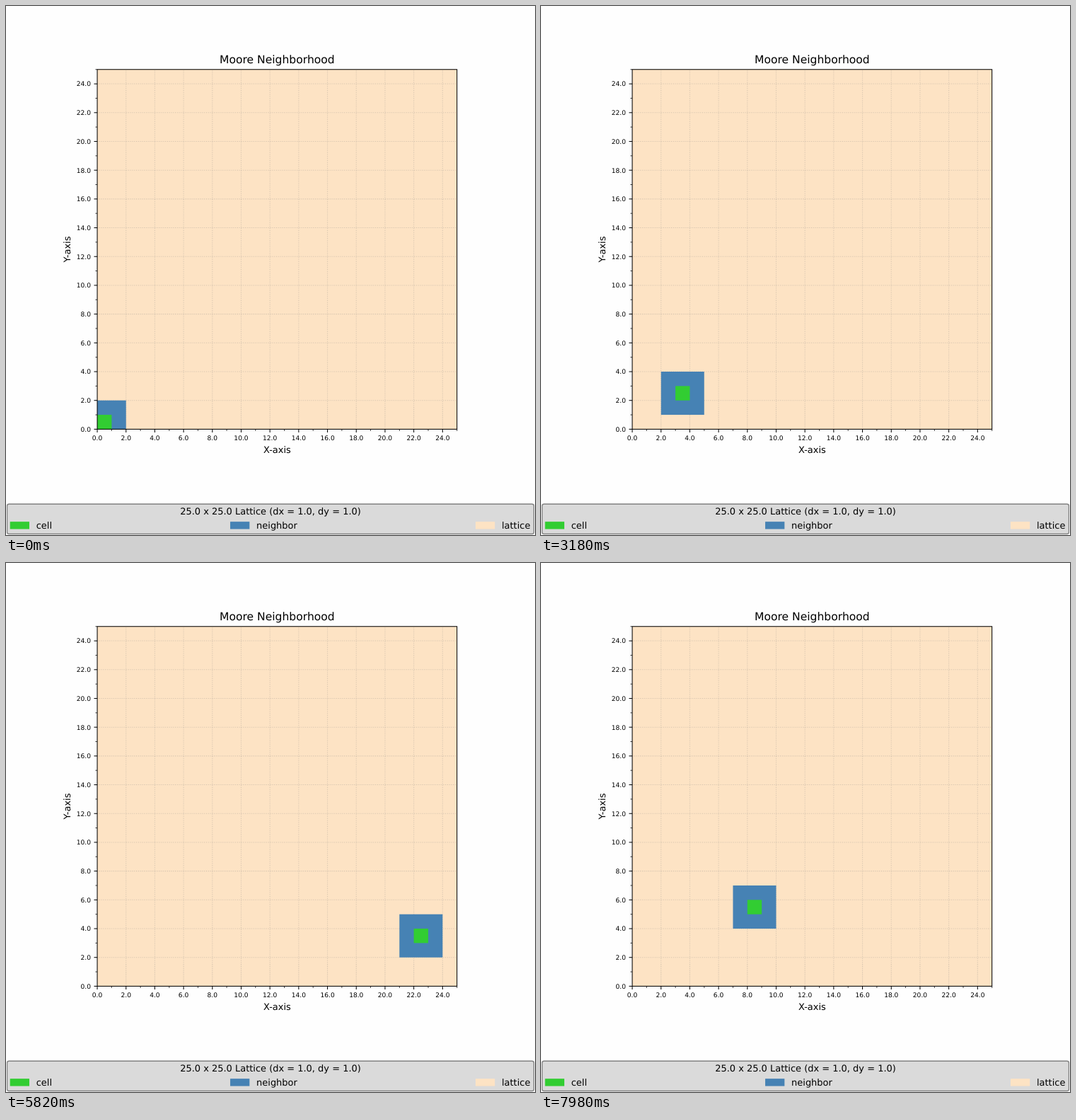
Write an HTML page that moves like this. It is 748 px wide and 748 px high and loops after 8000 ms.

```html
<!DOCTYPE html>
<html lang="en">
<head>
<meta charset="utf-8">
<title>Moore Neighborhood</title>
<style>
  html, body { margin: 0; width: 100%; height: 100%; overflow: hidden; background: #fefefe; }
  svg { display: block; width: 100vw; height: 100vh; }
  text { font-family: "DejaVu Sans", sans-serif; font-size: 13.89px; text-rendering: geometricPrecision; }
  .title { font-size: 16.67px; }
  .tick { font-size: 9.72px; }
  .mid { text-anchor: middle; }
  .end { text-anchor: end; }
  .line { fill: none; stroke: #000; stroke-width: 1.11; }
  .minor { stroke-width: 0.83; }
  .grid { stroke: #808080; stroke-opacity: 0.35; stroke-dasharray: 1.11 1.83; }
  .lattice { fill: #fde3c4; stroke: #fde3c4; }
  .neighbor { fill: #4682b4; stroke: #4682b4; }
  .cell { fill: #32cd32; stroke: #32cd32; }
  .area { stroke: none; }
  .swatch { stroke-width: 1.39; }
  .legend { fill: #dadada; stroke: #808080; stroke-width: 1.39; }
</style>
</head>
<body>
<svg id="plot" viewBox="0 0 800 800"></svg>
<script>
const SIZE = 25, LEFT = 138, BOTTOM = 640, SIDE = 544;
const UNIT = SIDE / SIZE, STEP = 60, LOOP = 8000;
const svg = document.getElementById("plot");

const px = x => LEFT + x * UNIT;
const py = y => BOTTOM - y * UNIT;

function add(tag, attrs, content = "") {
  const node = document.createElementNS("http://www.w3.org/2000/svg", tag);
  setAttrs(node, attrs);
  node.textContent = content;
  svg.append(node);
  return node;
}

function setAttrs(node, attrs) {
  for (const key in attrs) node.setAttribute(key, attrs[key]);
}

const rect = (cls, x, y, width, height, rx = 0) =>
  add("rect", { class: cls, x, y, width, height, rx });
const path = (cls, d) => add("path", { class: cls, d });
const label = (cls, x, y, content, more = {}) =>
  add("text", { class: cls, x, y, ...more }, content);

// Places a rectangle given by lattice bounds
function place(node, x0, y0, x1, y1) {
  setAttrs(node, { x: px(x0), y: py(y1), width: (x1 - x0) * UNIT, height: (y1 - y0) * UNIT });
}

rect("lattice area", LEFT, BOTTOM - SIDE, SIDE, SIDE);
for (let i = 2; i < SIZE; i += 2) {
  path("line grid", `M${px(i)} ${BOTTOM}v${-SIDE}`);
  path("line grid", `M${LEFT} ${py(i)}h${SIDE}`);
}

const neighbors = rect("neighbor area", 0, 0, 0, 0);
const cell = rect("cell area", 0, 0, 0, 0);

rect("line", LEFT, BOTTOM - SIDE, SIDE, SIDE);
for (let i = 0; i <= SIZE; i++) {
  const major = i % 2 === 0;
  const cls = major ? "line" : "line minor";
  const length = major ? 4.86 : 2.78;
  path(cls, `M${px(i)} ${BOTTOM}v${length}`);
  path(cls, `M${LEFT} ${py(i)}h${-length}`);
  if (major) {
    label("tick mid", px(i), 657, i.toFixed(1));
    label("tick end", 128.3, py(i) + 3.6, i.toFixed(1));
  }
}

label("title mid", 410, 86.4, "Moore Neighborhood");
label("mid", 410, 676, "X-axis");
label("mid", 0, 0, "Y-axis", { transform: "translate(97 368) rotate(-90)" });

rect("legend", 1.7, 753.2, 796.6, 45.2, 2.8);
label("mid", 400, 769.2, "25.0 x 25.0 Lattice (dx = 1.0, dy = 1.0)");
[["cell", 6.8], ["neighbor", 339.8], ["lattice", 710.8]].forEach(([name, x]) => {
  rect(`${name} swatch`, x, 780.6, 27.78, 9.72);
  label("", x + 38.9, 790, name);
});

function draw(time) {
  const step = Math.floor((time % LOOP) / STEP);
  const x = step % SIZE, y = Math.floor(step / SIZE);
  place(neighbors, Math.max(x - 1, 0), Math.max(y - 1, 0), Math.min(x + 2, SIZE), Math.min(y + 2, SIZE));
  place(cell, x, y, x + 1, y + 1);
}

const start = performance.now();
function tick() {
  draw(performance.now() - start);
  requestAnimationFrame(tick);
}
tick();
</script>
</body>
</html>
```
